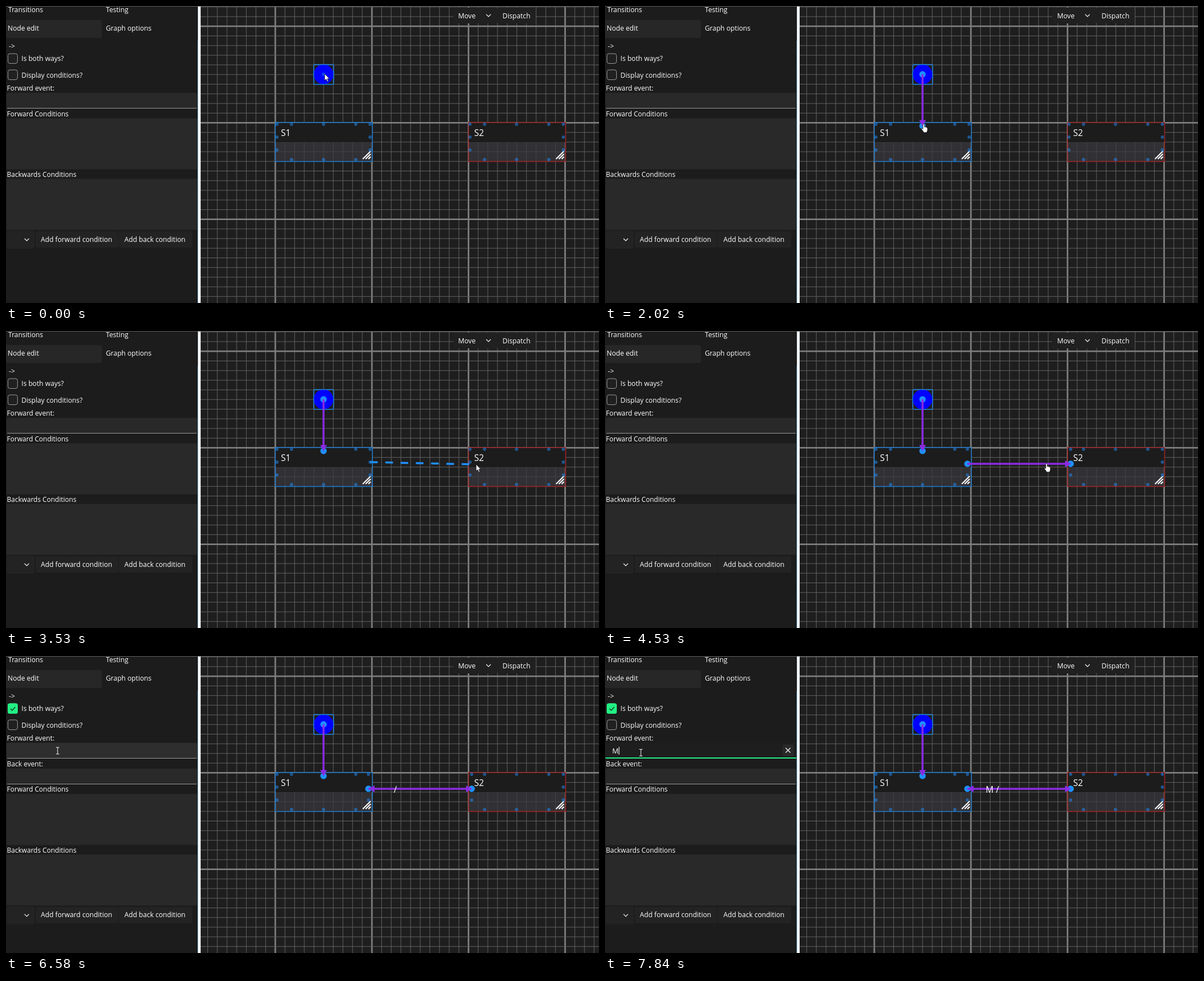
These frames come from a looping animation (1057x530 px, 7.99 s). An HTML page:

```html
<!DOCTYPE html>
<html lang="en">
<head>
<meta charset="utf-8">
<title>State graph editor</title>
<style>
html, body { margin: 0; width: 100%; height: 100%; overflow: hidden; background: #1e1e1e; }
svg { display: block; width: 1057px; height: 530px; }
text { font: 12.2px "Open Sans", "Noto Sans", sans-serif; fill: #fff; white-space: pre; }
.narrow { font-size: 12.05px; }
.big { font-size: 15.6px; }
.line { fill: none; stroke: #fff; stroke-width: 1.1; }
.box { fill: #292929; }
.btn { fill: #232323; }
.rule { fill: #9a9a9a; }
.check { fill: #202020; stroke: #9b9b9b; }
.accent { fill: #21f083; }
.port { fill: #1e90ff; }
.idle { opacity: .5; }
.link { fill: #8a2be2; stroke: #8a2be2; stroke-width: 3.5; }
.head { stroke: none; }
.drag { stroke: #1e90ff; stroke-width: 3.5; stroke-dasharray: 13.6; }
.pointer { fill: #fff; stroke: #000; stroke-width: .7; stroke-linejoin: round; }
</style>
</head>
<body>
<svg viewBox="0 0 1057 530">
  <rect width="1057" height="530" fill="#1e1e1e"/>
  <g id="grid"></g>

  <!-- toolbar -->
  <rect x="797" y="3" width="78" height="28" rx="3" fill="#202020"/>
  <rect x="875" y="3" width="69" height="28" rx="3" fill="#202020"/>
  <text x="806" y="21.5">Move</text>
  <path class="line" d="M856 15l4 4l4-4"/>
  <text x="885" y="21.5">Dispatch</text>

  <!-- graph -->
  <circle cx="566" cy="122" r="17.6" fill="#00f"/>
  <rect x="548.5" y="104.5" width="35.5" height="35.2" rx="2" fill="none" stroke="#1e88e8" stroke-width="1.4"/>
  <g id="nodes"></g>
  <g id="ports"></g>
  <g data-from="2020">
    <path class="link" d="M566 122V206"/>
    <path class="link head" d="M560 203.5h12l-6 11z"/>
  </g>
  <g data-from="4260">
    <path class="link" d="M646 237H823"/>
    <path class="link head" d="M820 231v12l11-6z"/>
  </g>
  <path class="link head" data-from="6130" d="M657 231v12l-11-6z"/>
  <text class="big" x="691" y="244" data-from="6130" data-to="7840">/</text>
  <text class="big" x="678.5" y="244" data-from="7840">M /</text>
  <line class="drag" id="drag"/>

  <!-- side panel -->
  <rect width="342" height="530" fill="#1c1c1c"/>
  <rect x="-4" y="25" width="175" height="32" rx="4" fill="#272727"/>
  <text x="4" y="11">Transitions</text>
  <text x="178" y="11">Testing</text>
  <text x="3" y="43.5">Node edit</text>
  <text x="178" y="43.5">Graph options</text>
  <text x="5" y="76">-&gt;</text>

  <rect class="check" x="3.5" y="85" width="17" height="17.5" rx="3.5"/>
  <rect x="4" y="85.5" width="16" height="16.5" rx="3" fill="#2b2b2b" data-from="5770" data-to="6130"/>
  <g data-from="6130">
    <rect class="accent" x="3" y="84.5" width="18" height="18.5" rx="3.5"/>
    <path d="M8 94l3 3l5.5-6" fill="none" stroke="#10301e" stroke-width="1.3"/>
  </g>
  <text x="27.5" y="98">Is both ways?</text>
  <rect class="check" x="3.5" y="114" width="17" height="17.5" rx="3.5"/>
  <text x="27.5" y="127.5">Display conditions?</text>

  <text x="1.5" y="151">Forward event:</text>
  <rect class="box" x="1" y="155" width="340" height="28" rx="3"/>
  <rect x="1" y="155" width="340" height="28" rx="3" fill="#2e2e2e" data-from="6580" data-to="7120"/>
  <rect class="rule" x="2" y="182" width="338" height="1"/>
  <g data-from="7120">
    <rect x="1" y="155" width="340" height="28" rx="3" fill="#1e1e1e"/>
    <rect class="accent" x="1" y="181" width="341" height="2"/>
    <rect x="316.500" y="158" width="20" height="21" rx="3" fill="#292929"/>
    <path class="line" d="M322 164l8.500 8.500m0-8.500l-8.500 8.500"/>
    <path class="line" d="M14 162v14" data-to="7750"/>
  </g>
  <g data-from="7750">
    <text x="13" y="173.500">M</text>
    <path class="line" d="M25 162v14"/>
  </g>

  <g data-from="6130">
    <text x="1.5" y="196.5">Back event:</text>
    <rect class="box" x="1" y="201" width="340" height="28" rx="3"/>
    <rect class="rule" x="2" y="228" width="338" height="1"/>
  </g>
  <g id="lower">
    <text class="narrow" x="1.5" y="196.5">Forward Conditions</text>
    <rect class="box" x="1" y="200.5" width="340" height="91"/>
    <text class="narrow" x="1.5" y="305">Backwards Conditions</text>
    <rect class="box" x="1" y="308.5" width="340" height="91"/>
    <rect class="btn" x="1" y="401" width="50" height="32" rx="3"/>
    <path class="line" d="M33 415l4 4l4-4"/>
    <rect class="btn" x="53" y="402" width="147" height="29" rx="3"/>
    <text x="62" y="420.500">Add forward condition</text>
    <rect class="btn" x="201" y="402" width="131" height="29" rx="3"/>
    <text x="211" y="420.500">Add back condition</text>
  </g>
  <rect x="341" y="62" width="1.200" height="468" fill="#24506a"/>
  <rect x="342" width="5" height="530" fill="#eef3f8"/>
  <rect width="1057" height="1" fill="#5c5c5c"/>

  <g id="cursor" class="pointer">
    <path id="arrow" d="M0 0V12L2.800 9.500L4.700 13.700L6.600 12.900L4.800 8.800H8.400Z"/>
    <path id="hand" d="M-1.300 1.300q1.300-2 2.600 0v4.500q1.200-.8 2 .4q1.300-.6 1.900.6q1.600-.5 1.700 1.200v3.200q0 1.500-1 2.700v1.900h-6.300v-1.500l-3.300-4.300q-.8-2 .8-1.900l1.600 1.500z"/>
    <path id="beam" d="M-3-6h2l1 .7l1-.7h2M0-5.500v11M-3 6h2l1-.7l1 .7h2" fill="none" stroke="#e8e8e8" stroke-width="1.100"/>
  </g>
</svg>
<script>
const LOOP = 7990;
const $ = id => document.getElementById(id);

function add(parent, tag, attrs) {
  const el = document.createElementNS("http://www.w3.org/2000/svg", tag);
  for (const name in attrs) el.setAttribute(name, attrs[name]);
  return parent.appendChild(el);
}

// Grid: every tenth line is heavy.
function gridLines(start, first, end, draw) {
  const cell = 17.22;
  for (const heavy of [false, true]) {
    for (let i = Math.ceil((first - start) / cell); start + i * cell < end; i++) {
      if ((i % 10 === 0) !== heavy) continue;
      add($("grid"), "path", {
        d: draw(start + i * cell),
        stroke: heavy ? "#7e7e7e" : "#626262",
        "stroke-width": heavy ? 2.8 : 1
      });
    }
  }
}
gridLines(480, 347, 1057, x => `M${x} 0V530`);
gridLines(36.2, 0, 530, y => `M347 ${y}H1057`);

function port(x, y, from, to, linked) {
  const attrs = { cx: x, cy: y, r: linked ? 5.7 : 2.9, class: linked ? "port" : "port idle" };
  if (from) attrs["data-from"] = from;
  if (to) attrs["data-to"] = to;
  add($("ports"), "circle", attrs);
}

function node(x, name, color) {
  const g = add($("nodes"), "g", { transform: `translate(${x} 208)` });
  add(g, "rect", { width: 173, height: 70, fill: "#39383e", opacity: .72 });
  add(g, "rect", { width: 173, height: 35, fill: "#1c1c1c" });
  add(g, "rect", { width: 173, height: 69.5, fill: "none", stroke: color, "stroke-width": 1.5 });
  add(g, "text", { x: 10, y: 24, class: "big" }).textContent = name;
  add(g, "path", { d: "M156 65l14-14M161 65l9-9M166 65l4-4", stroke: "#fff", "stroke-width": 2.2 });
}
node(480, "S1", "#1f7bd0");
node(824.5, "S2", "#a32424");

for (const x of [483, 827]) {
  const first = x === 483;
  for (const dx of [26, 83, 140.5]) {
    const linked = first && dx === 83;
    port(x + dx, 211, 0, linked && 2020);
    port(x + dx, 274);
  }
  for (const y of [211, 234, 257]) {
    const still = first ? x : x + 166.5;
    const moving = first ? x + 166 : x;
    const joins = y === 234;
    port(still, y);
    port(moving, y, 0, 4260);
    port(moving + (first ? -3 : 3), joins ? 237 : y, 4260, 0, joins);
  }
}
port(566, 122, 0, 2020);
port(566, 122, 2020, 0, true);
port(566, 214, 2020, 0, true);

// Pointer moves: first time, last time, steps, shape, waypoints.
const moves = [
  [0, 0, 1, "arrow", [[568, 121]]],
  [940, 1030, 2, "arrow", [[575, 148], [580, 178]]],
  [1120, 1480, 5, "arrow", [[579, 192], [573, 204], [568, 209]]],
  [2020, 2020, 1, "hand", [[568, 210]]],
  [2190, 2540, 5, "arrow", [[573, 216], [624, 231], [661, 237]]],
  [2630, 2720, 2, "arrow", [[656, 236], [652, 232]]],
  [2900, 2900, 1, "arrow", [[650, 232]]],
  [3080, 3530, 6, "arrow", [[662, 234], [752, 237], [838, 238]]],
  [3710, 3800, 2, "arrow", [[834, 235], [830, 234]]],
  [4260, 4530, 4, "hand", [[820, 235], [787, 236]]],
  [4960, 4960, 1, "hand", [[765, 235]]],
  [5050, 5410, 5, "arrow", [[690, 230], [420, 192], [175, 164]]],
  [5500, 5500, 1, "beam", [[144, 162]]],
  [5680, 5950, 4, "hand", [[118, 128], [70, 102], [53, 97]]],
  [6310, 6400, 2, "hand", [[60, 99], [77, 116]]],
  [6490, 6490, 1, "arrow", [[89, 142]]],
  [6580, 7030, 6, "beam", [[92, 169], [84, 206], [70, 206], [64, 172.500]]]
];

function pointerAt(t) {
  const [from, to, steps, shape, path] = moves.filter(m => m[0] <= t).pop();
  if (steps === 1) return { shape, x: path[0][0], y: path[0][1] };
  const step = Math.min(steps - 1, Math.floor((t - from) * (steps - 1) / (to - from)));
  const pos = step / (steps - 1) * (path.length - 1);
  const i = Math.min(path.length - 2, Math.floor(pos));
  const mix = axis => path[i][axis] + (path[i + 1][axis] - path[i][axis]) * (pos - i);
  return { shape, x: mix(0), y: mix(1) };
}

const show = (el, on) => { el.style.display = on ? "" : "none"; };
const timed = [...document.querySelectorAll("[data-from], [data-to]")];

function drawDrag(t, p) {
  const first = t >= 700 && t < 2020;
  const second = t >= 2900 && t < 4260;
  show($("drag"), first || second);
  const [x1, y1] = first ? [566, 122] : [649, 234];
  const ends = { x1, y1, x2: p.x, y2: p.y };
  for (const name in ends) $("drag").setAttribute(name, ends[name]);
}

function render(t) {
  for (const el of timed) {
    const { from = 0, to = LOOP } = el.dataset;
    show(el, t >= +from && t < +to);
  }
  $("lower").setAttribute("transform", `translate(0 ${t >= 6130 ? 45.7 : 0})`);
  const p = pointerAt(t);
  for (const shape of ["arrow", "hand", "beam"]) show($(shape), shape === p.shape);
  $("cursor").setAttribute("transform", `translate(${p.x} ${p.y})`);
  drawDrag(t, p);
}

const start = performance.now();
function frame() {
  render((performance.now() - start) % LOOP);
  requestAnimationFrame(frame);
}
frame();
</script>
</body>
</html>
```
